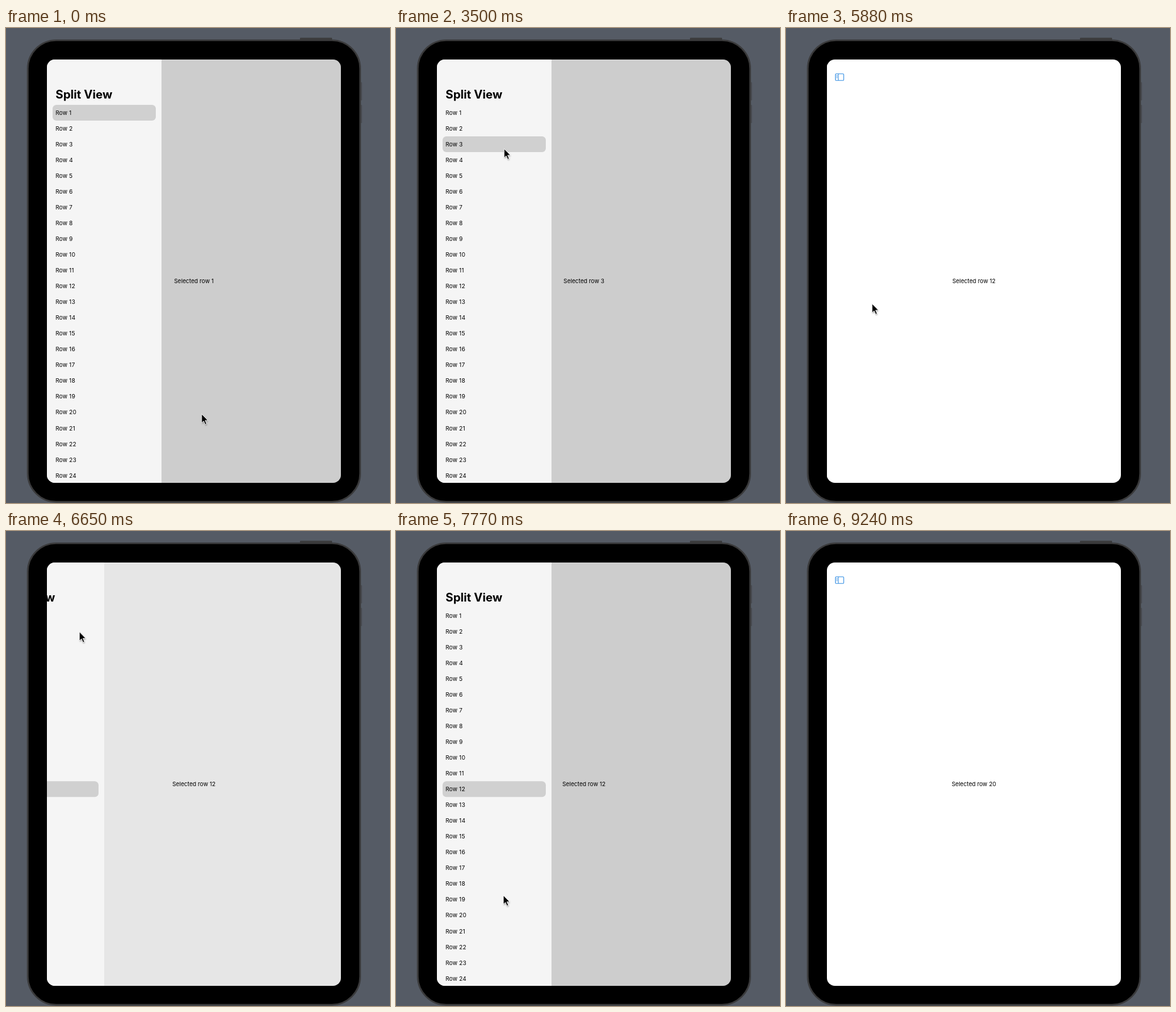
An HTML page that plays this animation: 610 by 754 pixels, repeating every 9800 ms.

```html
<!DOCTYPE html>
<html lang="en">
<head>
<meta charset="utf-8">
<title>Split view</title>
<style>
  html, body { margin: 0; width: 100%; height: 100%; overflow: hidden; background: #555b65; }
  svg { display: block; width: 610px; height: 754px; }
  text { font-family: Inter, Roboto, sans-serif; font-size: 9.2px; fill: #000; }
  #rows text { letter-spacing: .1px; }
  #sidebar .title { font-size: 18.5px; font-weight: 700; }
</style>
</head>
<body>
<svg viewBox="0 0 610 754">
  <defs>
    <clipPath id="screen"><rect x="65" y="50" width="467" height="672" rx="12.5"/></clipPath>
    <filter id="soft" x="-50%" y="-50%" width="200%" height="200%"><feGaussianBlur stdDeviation="1"/></filter>
    <path id="arrow" d="M.4 .5V14.7L3.6 11.7L6.1 17.2L8.4 16.2L6 10.8H10.5Z"/>
  </defs>
  <rect width="610" height="754" fill="#555b65"/>
  <rect x="467" y="15.5" width="51" height="4" rx="1" fill="#3b3b3c"/>
  <g fill="#484b50">
    <rect x="562" y="86" width="3.5" height="29" rx="1"/>
    <rect x="562" y="122" width="3.5" height="29" rx="1"/>
  </g>
  <rect x="34.6" y="19.5" width="528" height="732.6" rx="45" fill="#000" stroke="#3a3a3b" stroke-width="2.6"/>
  <g clip-path="url(#screen)">
    <rect x="65" y="50" width="467" height="672" fill="#fff"/>
    <g fill="none" stroke="#3b92e4">
      <rect x="78.5" y="72.7" width="13.2" height="10.6" rx="1.4" stroke-width="1.1"/>
      <path d="M83.2 73V83" stroke-width="1"/>
      <path d="M79.9 75.4H82M79.9 77.2H82M79.9 79H82" stroke-width=".8"/>
    </g>
    <rect id="dim" x="65" y="50" width="467" height="672"/>
    <text id="detail" x="298.5" y="404.8" text-anchor="middle"></text>
    <g id="sidebar">
      <rect x="65" y="50" width="182" height="672" fill="#f5f5f5"/>
      <rect id="mark" x="74" width="164" height="25" rx="6" fill="#d0d0d0"/>
      <text class="title" x="78.8" y="112.4">Split View</text>
      <g id="rows"></g>
    </g>
  </g>
  <g id="cursor">
    <use href="#arrow" transform="translate(.6 1.6)" opacity=".4" filter="url(#soft)"/>
    <use href="#arrow" stroke="#fff" stroke-width=".9" stroke-linejoin="round"/>
  </g>
</svg>
<script>
const LOOP = 9800, STEP = 70;
const TOP = 121.9, ROW = 25.04, WIDTH = 182;
const $ = id => document.getElementById(id);
const set = (id, name, value) => $(id).setAttribute(name, value);

// pointer gestures: start, duration, x, y to reach
const moves = [
  [0, 840, 84, 176], [840, 280, -14, 225], [2450, 630, 171, 191],
  [3500, 280, 133, 238], [3990, 280, 174, 328], [4480, 280, 174, 418],
  [4970, 280, 373, 474], [5390, 490, 136, 437], [5880, 420, 82, 74],
  [6440, 490, 168, 291], [7490, 350, 170, 611], [8050, 490, 439, 409]
];
const taps = [3220, 3920, 4410, 4900, 7910];
const toggles = [5325, 6530, 8662];
const POINTER_GONE = 9100;

const smooth = u => u * u * (3 - 2 * u);
const rowAt = y => 1 + Math.floor((y - TOP) / ROW);

// critically damped, cut off once it has settled
function spring(ms) {
  const k = ms * 0.014;
  return k > 8 ? 1 : 1 - (1 + k) * Math.exp(-k);
}

function pointer(t) {
  let x = 310, y = 612;
  for (const [at, span, toX, toY] of moves) {
    if (t < at) break;
    const s = smooth(Math.min(1, (t - at) / span));
    x += (toX - x) * s;
    y += (toY - y) * s;
  }
  return [x, y];
}

function openness(t) {
  return toggles.reduce((open, at, i) =>
    t < at ? open : open + (i % 2 - open) * spring(t - at), 1);
}

// a press clears the highlight, the release selects the row under the pointer
function selection(t) {
  const selected = taps.filter(at => t >= at + STEP).pop();
  return {
    row: selected ? rowAt(pointer(selected - STEP)[1]) : 1,
    pressed: taps.some(at => t >= at && t < at + STEP)
  };
}

function draw(t) {
  const open = openness(t), { row, pressed } = selection(t), [x, y] = pointer(t);
  set('sidebar', 'transform', `translate(${Math.round((open - 1) * WIDTH)} 0)`);
  set('dim', 'opacity', 0.196 * open);
  $('detail').textContent = 'Selected row ' + row;
  set('mark', 'y', TOP + (row - 1) * ROW);
  set('mark', 'visibility', pressed ? 'hidden' : 'visible');
  set('cursor', 'transform', `translate(${x + 0.4} ${y + 0.2})`);
  set('cursor', 'visibility', t < POINTER_GONE ? 'visible' : 'hidden');
}

for (let i = 0; i < 24; i++) {
  const label = document.createElementNS('http://www.w3.org/2000/svg', 'text');
  label.setAttribute('x', 78.7);
  label.setAttribute('y', 137.7 + i * ROW);
  label.textContent = 'Row ' + (i + 1);
  $('rows').append(label);
}

// the screen refreshes in fixed steps
const start = performance.now();
function tick() {
  const t = (performance.now() - start) % LOOP;
  draw(Math.floor(t / STEP) * STEP);
  requestAnimationFrame(tick);
}
draw(0);
requestAnimationFrame(tick);
</script>
</body>
</html>
```
